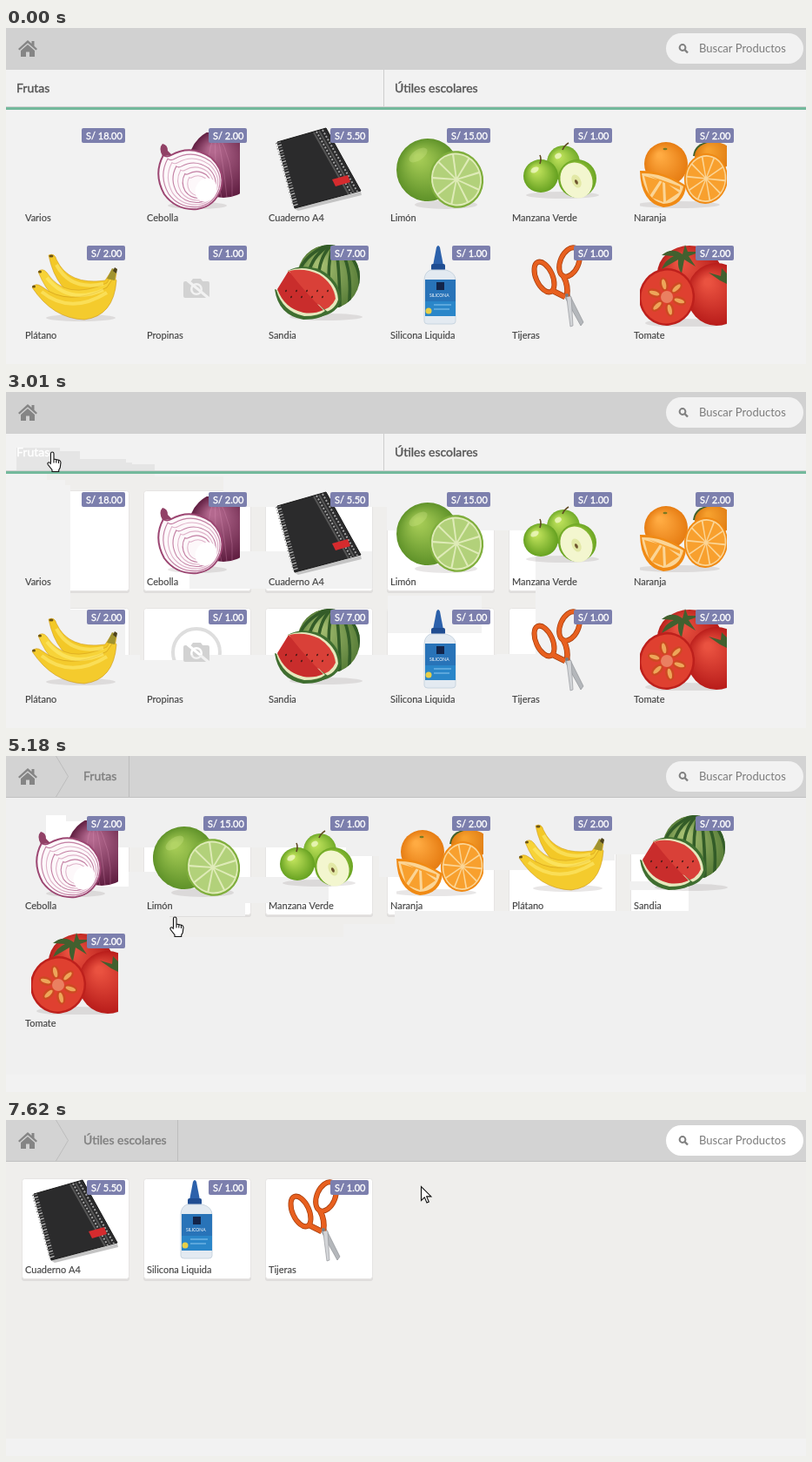
These frames come from a looping animation (920 px wide and 386 px high, 7.99 s). An HTML page with a canvas:

```html
<!DOCTYPE html>
<html lang="es">
<head>
<meta charset="utf-8">
<title>Catálogo de productos</title>
<style>
html, body { margin: 0; width: 100%; height: 100%; overflow: hidden; background: #f2f2f2; }
canvas { display: block; }
</style>
</head>
<body>
<canvas id="stage" width="920" height="386"></canvas>
<script>
const g = document.getElementById('stage').getContext('2d');
const LOOP = 7990, STEP = 120, TAU = Math.PI * 2;
const FONT = 'px Lato, "Open Sans", sans-serif';

// ---------- drawing helpers ----------
function rect(x, y, w, h, fill) { g.fillStyle = fill; g.fillRect(x, y, w, h); }

function round(x, y, w, h, r, fill, stroke) {
  g.beginPath();
  g.roundRect(x, y, w, h, r);
  g.fillStyle = fill;
  g.fill();
  if (stroke) { g.strokeStyle = stroke; g.lineWidth = 1; g.stroke(); }
}

function shape(d, fill, stroke, w = 1) {
  const p = new Path2D(d);
  if (fill) { g.fillStyle = fill; g.fill(p); }
  if (stroke) { g.strokeStyle = stroke; g.lineWidth = w; g.stroke(p); }
}

function oval(x, y, rx, ry, fill, rot = 0, stroke, w = 1) {
  g.beginPath();
  g.ellipse(x, y, rx, ry, rot, 0, TAU);
  if (fill) { g.fillStyle = fill; g.fill(); }
  if (stroke) { g.strokeStyle = stroke; g.lineWidth = w; g.stroke(); }
}

function ball(x, y, rx, ry, light, dark, rot = 0) {
  const r = Math.max(rx, ry);
  const grad = g.createRadialGradient(x - rx * .3, y - ry * .4, r * .1, x, y, r);
  grad.addColorStop(0, light);
  grad.addColorStop(1, dark);
  oval(x, y, rx, ry, grad, rot);
}

// a thin stroke gives the medium weight
function text(s, x, y, size, fill, heavy = 0) {
  g.font = size + FONT;
  g.fillStyle = g.strokeStyle = fill;
  g.fillText(s, x, y);
  if (heavy) { g.lineWidth = heavy; g.strokeText(s, x, y); }
}

function at(x, y, draw) {
  g.save();
  g.translate(x, y);
  draw();
  g.restore();
}

function crop(y, h) {
  g.beginPath();
  g.rect(11, y, 100, h);
  g.clip();
}

function shadow(x, y, rx, ry) { oval(x, y, rx, ry, 'rgba(90,80,80,.14)'); }

// cut face with n wedges
function citrus(x, y, rx, ry, rot, rind, pith, flesh, n) {
  oval(x, y, rx, ry, rind, rot);
  oval(x, y, rx * .93, ry * .93, pith, rot);
  at(x, y, () => {
    g.rotate(rot);
    g.scale(rx, ry);
    g.fillStyle = flesh;
    for (let i = 0; i < n; i++) {
      const a = i * TAU / n, m = a + Math.PI / n;
      g.beginPath();
      g.moveTo(.08 * Math.cos(m), .08 * Math.sin(m));
      g.arc(0, 0, .87, a + .04, a + TAU / n - .04);
      g.fill();
    }
  });
}

// ---------- product pictures, in card coordinates ----------
const art = {
  onion() {
    crop(7, 90);
    shadow(62, 91, 34, 4);
    ball(92, 42, 40, 40, '#b4698f', '#5f1d40');
    for (let i = 0; i < 4; i++)
      shape(`M84 6Q${66 + i * 13} 40 ${84 + i * 6} 82`, null, 'rgba(220,150,185,.3)', 1);
    const skin = 'M23 33Q27 36 32 33Q55 20 78 36Q95 52 89 72Q82 92 62 95Q38 97 24 78Q11 55 23 33Z';
    shape(skin, '#fdf8fa', '#9c4672', 2);
    for (let i = 1; i < 7; i++) {
      const k = 1 - i * .11;
      at(68 * (1 - k), 72 * (1 - k), () => {
        g.scale(k, k);
        shape(skin, null, i % 2 ? '#c27fa3' : '#dfb3ca', 1.1 / k);
      });
    }
    oval(72, 73, 12, 14, '#fff', .5);
    shape('M22 34Q17 25 22 20Q28 21 28 28L33 33Z', '#914166');
  },
  lime() {
    shadow(68, 90, 36, 5);
    ball(47, 50, 36, 36, '#a5cb55', '#5f9229', -.6);
    oval(36, 33, 12, 6, 'rgba(220,240,150,.25)', -.6);
    citrus(80, 61, 31, 33, -.3, '#7fae3c', '#dfebb8', '#b2d17a', 9);
  },
  apple() {
    shadow(62, 79, 42, 4);
    ball(63, 42, 19, 20, '#bfe25b', '#6fa928');
    ball(37, 57, 20, 19, '#c3e45d', '#64a01f');
    ball(79, 60, 22, 22, '#bfe04e', '#6ba524');
    oval(78, 62, 18, 21, '#f3f6cf', -.45);
    oval(78, 63, 5, 8, '#e2e8a5', -.45);
    oval(78, 64, 1.6, 3, '#6f5530', -.45);
    oval(30, 50, 5, 3, 'rgba(255,255,230,.6)', -.5);
    oval(57, 34, 4, 3, 'rgba(255,255,230,.6)', -.5);
    shape('M62 27Q64 22 69 19M36 43Q38 37 36 33', null, '#5f4a22', 1.6);
  },
  orange() {
    crop(16, 78);
    shadow(55, 90, 48, 4);
    shape('M72 34Q74 18 92 18Q98 28 90 36Z', '#41612c');
    ball(96, 34, 22, 16, '#f6a02d', '#de7a12');
    ball(41, 43, 25, 25, '#ffab42', '#e67c12');
    oval(40, 26, 2.5, 1.2, '#7a7a24');
    citrus(87, 60, 25, 29, .1, '#f08a14', '#fbd596', '#f8a02e', 10);
    shape('M11 51Q36 50 64 68Q62 91 38 93Q12 88 11 51Z', '#f08a14');
    shape('M13 54Q36 53 61 69Q57 88 38 89Q17 84 13 54Z', '#fbd596');
    shape('M16 57L34 62 22 80ZM37 63L38 87 25 82ZM40 64L56 76 41 86ZM20 56L57 69 57 73Z', '#f8a02e');
  },
  banana() {
    shadow(68, 85, 40, 4);
    shape('M31 13Q38 10 40 18Q54 48 96 42L104 30 109 34Q104 64 73 64Q40 57 31 13Z', '#f3c827', '#d09a18', .6);
    shape('M19 32Q24 27 29 33Q50 66 98 45L105 33 108 38Q103 78 67 78Q34 70 19 32Z', '#f7d338', '#d3a01d', .6);
    shape('M12 50Q16 44 23 49Q54 73 98 50L106 38 109 42Q106 83 72 87Q36 86 12 50Z', '#f4cb2d', '#cb9617', .6);
    shape('M23 55Q56 82 98 56M29 39Q54 70 94 53M40 24Q56 54 94 46', null, 'rgba(255,238,120,.55)', 4);
    shape('M98 40L104 28 109 30 107 42Z', '#a09330');
    shape('M105 31L107 27 110 29 109 34Z', '#4d421b');
    oval(34, 14, 2.5, 1.6, '#6b5315');
    oval(21, 32, 2, 1.6, '#6b5315');
    oval(14, 49, 2, 1.6, '#6b5315');
  },
  camera(fresh) {
    if (fresh) oval(61, 51, 27, 27, null, 0, '#dedede', 4);
    const c = '#d2d2d2', bg = fresh ? '#fff' : '#f2f2f2';
    round(46, 43, 30, 19, 2, c);
    shape('M54 44L57 40H66L69 44Z', c);
    oval(61, 52, 7, 7, bg);
    oval(61, 52, 4.5, 4.5, c);
    shape('M47 39L77 64', null, bg, 3);
  },
  melon() {
    shadow(70, 84, 42, 4);
    g.save();
    g.beginPath();
    g.ellipse(73, 38, 36, 37, 0, 0, TAU);
    g.clip();
    ball(73, 38, 37, 37, '#a3bd70', '#587d38');
    for (let i = 0; i < 8; i++)
      shape(`M80 -2Q${14 + i * 18} 22 ${50 + i * 9} 82`, null, '#335c28', 3.6);
    g.restore();
    // back piece, then the wedge in front
    shape('M26 31Q42 22 64 30Q86 42 87 64Q84 80 62 84Q40 84 26 31Z', '#3f6e30');
    shape('M26 31Q44 24 63 33Q83 45 84 64Q80 78 62 80Q40 78 26 31Z', '#e6e8bd');
    shape('M28 31Q45 27 62 35Q79 46 81 63Q76 75 62 77Q42 76 28 31Z', '#d94038');
    shape('M11 52Q15 82 44 87Q66 87 72 78L64 72Z', '#3f6e30');
    shape('M13 53Q20 78 45 83Q62 83 69 77L62 70Z', '#e6e8bd');
    shape('M14 52L27 31Q48 58 67 76Q56 81 44 79Q22 74 14 52Z', '#c92d2c');
    for (let i = 0; i < 9; i++) oval(24 + i * 6, 54 + (i * 7) % 14, .9, 1.4, '#4a1a15', .4);
  },
  bottle() {
    shape('M57 4Q59 0 61 4L65 25H53Z', '#2c61ab');
    round(51, 23, 16, 8, 2, '#1f4d92');
    shape('M50 30H68Q79 33 79 42V89Q79 92 75 92H47Q43 92 43 89V42Q43 33 50 30Z', '#e3eaf1', '#c9d5e0');
    rect(44, 41, 35, 42, '#2873b8');
    rect(44, 66, 35, 17, '#2a86c9');
    rect(57, 44, 9, 9, '#13254a');
    text('SILICONA', 49, 61, 5, '#fff');
    shape('M54 70H74M54 75H72', null, '#8cc7ef', 1.2);
    oval(48, 77, 3.5, 3.5, '#e8cf48');
  },
  scissors() {
    shape('M63 58L68 54 86 90 83 94Z', '#b4b7bb', '#85888d', .6);
    shape('M66 56L72 61 74 94 71 95Z', '#d2d4d7', '#8b8e92', .6);
    for (const [c, w] of [['#a9400f', 6], ['#e8601f', 4.4]]) {
      oval(41, 38, 9.5, 18.5, null, -.42, c, w);
      oval(70, 21, 10.5, 17.5, null, .4, c, w);
      shape('M49 53L65 61M63 37Q69 48 67 60', null, c, w + .6);
    }
    oval(67, 59, 2, 2, '#777b80');
  },
  tomato() {
    crop(0, 95);
    shadow(65, 91, 48, 5);
    ball(68, 34, 37, 32, '#ea5240', '#b51c1a');
    ball(99, 58, 34, 36, '#ea5240', '#b81c1a');
    shape('M60 12Q48 3 36 13L50 14Q40 18 36 29L55 18Q54 28 59 34L62 18 75 26 67 14 81 9 66 9 63 1Z', '#42602f');
    shape('M103 42L90 33 104 37 105 28 111 34V46Z', '#42602f');
    oval(42, 61, 32, 33, '#bd201c', .3);
    oval(42, 61, 29.5, 30.5, '#df4030', .3);
    for (let i = 0; i < 6; i++) {
      const a = i * TAU / 6 + .3, c = Math.cos(a), s = Math.sin(a);
      oval(42 + 15 * c, 61 + 15 * s, 8, 5, '#cd4a22', a);
      oval(42 + 15 * c, 61 + 15 * s, 6, 2.4, '#eda65a', a);
    }
    oval(42, 61, 7, 7, '#ea8061');
  },
  notebook() {
    shape('M33 94L110 75 111 79 38 97Z', '#c4c4c4');
    shape('M14 18L70 2 110 74 34 94Z', '#2b2b2c', '#191919');
    shape('M56 7L96 78M62 5L102 76', null, '#555', 2);
    g.setLineDash([2, 2]);
    shape('M59 6L99 77M66 4L106 75', null, '#a4a4a4', 2);
    g.setLineDash([]);
    for (let i = 0; i < 24; i++) {
      const x = 14 + i * .85, y = 19 + i * 3.1;
      shape(`M${x - 2} ${y + 1}L${x + 4} ${y - 1}`, null, i % 2 ? '#bbb' : '#777', 1.3);
    }
    shape('M77 61L95 56 98 64 81 69Z', '#d52b2e');
  }
};

// ---------- catalogue ----------
const item = (name, price, pic) => ({ name, price, pic });
const all = [
  item('Varios', '18.00'), item('Cebolla', '2.00', 'onion'),
  item('Cuaderno A4', '5.50', 'notebook'), item('Limón', '15.00', 'lime'),
  item('Manzana Verde', '1.00', 'apple'), item('Naranja', '2.00', 'orange'),
  item('Plátano', '2.00', 'banana'), item('Propinas', '1.00', 'camera'),
  item('Sandia', '7.00', 'melon'), item('Silicona Liquida', '1.00', 'bottle'),
  item('Tijeras', '1.00', 'scissors'), item('Tomate', '2.00', 'tomato')
];
const pick = ids => ids.map(i => all[i]);
const home = { items: all, top: 113, bg: '#f2f2f2' };
const fruit = { items: pick([1, 3, 4, 5, 6, 8, 11]), top: 67, bg: '#f0f0f0', title: 'Frutas', end: 141 };
const school = { items: pick([2, 9, 10]), top: 67, bg: '#efeeec', title: 'Útiles escolares', end: 197, fresh: true };
const pages = [[0, home], [3130, fruit], [6390, home], [7620, school]];

// pointer stops: start time, then x, y every STEP ms
const moves = [
  [1000, 194, 284, 154, 120, 154, 97, 128, 83],
  [1500, 74, 81, 74, 97, 137, 226, 422, 278],
  [2000, 547, 277],
  [2150, 592, 159, 494, 210, 421, 159, 233, 132],
  [2650, 141, 97, 121, 83, 68, 77, 47, 68, 46, 68],
  [3380, 52, 75, 81, 126, 124, 109, 265, 105, 374, 115, 412, 139, 470, 139],
  [4220, 626, 131, 700, 120, 768, 113, 768, 154, 600, 154, 430, 150, 371, 169],
  [5060, 275, 184, 188, 184, 105, 212, 100, 231],
  [5670, 100, 180, 72, 150, 60, 110, 45, 67, 30, 42, 27, 28, 27, 28],
  [6510, 84, 56, 30, 80, 232, 107],
  [6900, 320, 112, 436, 109, 470, 95, 490, 80, 485, 72, 478, 75, 477, 76]
];
const stops = moves.flatMap(([t, ...p]) =>
  Array.from({ length: p.length / 2 }, (_, i) => ({ t: t + i * STEP, x: p[2 * i], y: p[2 * i + 1] })));

const cardPos = (page, i) => [18 + i % 6 * 140, page.top + (i / 6 | 0) * 135];

function drawCard(page, i, fresh) {
  const { name, price, pic } = page.items[i], [x, y] = cardPos(page, i);
  if (fresh) {
    round(x, y + 2, 124, 116, 3, '#dfdddc');
    round(x + .5, y + .5, 123, 115, 3, '#fff', '#e6e4e3');
  }
  if (pic) at(x, y, () => art[pic](fresh));
  text(name, x + 4, y + 109, 11, '#444', .15);
  const w = price.length > 4 ? 50 : 44;
  round(x + 119 - w, y + 2, w, 17, 2, '#7c7fad');
  text('S/ ' + price, x + 124 - w, y + 15, 11, '#fff', .35);
}

function drawHeader(page) {
  rect(0, 0, 920, 48, page.title ? '#d3d3d3' : '#d1d1d1');
  shape('M25 14L14 24 15.5 25.5 25 17.3 34.5 25.5 36 24 32.5 20.8V15H29.5V18Z', '#858585');
  shape('M25 19L17 26V33H23V27.5H27V33H33V26Z', '#858585');
  if (page.title) {
    rect(0, 47, 920, 1, '#c2c2c2');
    shape(`M57.5 0L71.5 23.5 57.5 47M${page.end + .5} 0V47`, null, '#bdbdbd');
    text(page.title, 89, 28, 14, '#7f7f7f', .4);
  }
  round(759, 6, 158, 35, 17.5, page.fresh ? '#fff' : '#f2f2f2');
  oval(778, 22.5, 3.4, 3.4, null, 0, '#808080', 2);
  shape('M780.5 25L784 28.5', null, '#808080', 2.4);
  text('Buscar Productos', 797, 28, 13, '#7b7b7b');
}

function drawPage(page, fresh, tab) {
  rect(0, 48, 920, 338, '#f2f2f2');
  rect(0, 48, 920, 318, fresh ? '#efeeec' : page.bg);
  if (!page.title) {
    rect(0, 48, 920, 42, fresh ? '#e5e5e5' : '#f2f2f2');
    rect(434, 48, 1, 42, '#cdcdcd');
    rect(0, 90, 920, 1, '#cfcfcf');
    rect(0, 91, 920, 3, '#74b99c');
    text('Frutas', 12, 74, 14, tab === 1 ? '#fff' : '#555', .4);
    text('Útiles escolares', 447, 74, 14, tab === 2 ? '#fff' : '#555', .4);
  }
  page.items.forEach((_, i) => drawCard(page, i, fresh));
}

function drawPointer(page, { x, y }, tab) {
  const hx = x + 5;
  const onCard = page.items.some((_, i) => {
    const [cx, cy] = cardPos(page, i);
    return hx >= cx && hx < cx + 124 && y >= cy && y < cy + 118;
  });
  const hand = onCard || tab || (y < 48 && hx < 45);
  at(x + .5, y + .5, () => shape(hand
    ? 'M4 13V2.2a1.7 1.7 0 0 1 3.5 0V8.5l6 1.3q2 .6 2 2.8l-.8 6-1.5 2.5V23H5.5V21L.8 15q-1-2 .6-2.6T4 14.5M7.5 8.5V13M10.3 9.5V13M13 10V13.5'
    : 'M0 0V16L3.8 12.4 6.5 18.5 8.8 17.5 6.2 11.4H11.4Z', '#fff', '#111', 1.1));
}

function draw(t) {
  const [from, page] = pages.filter(p => p[0] <= t).pop();
  const seen = stops.filter(s => s.t <= t), last = seen[seen.length - 1];
  const tab = last && !page.title && last.y >= 48 && last.y < 90
    ? (last.x < 60 && last.y < 75 ? 1 : last.x > 434 ? 2 : 0) : 0;
  drawHeader(page);
  drawPage(page, page.fresh, tab);
  // areas the pointer swept are repainted with crisp cards
  if (last && !page.fresh) {
    g.save();
    g.beginPath();
    seen.forEach((b, i) => {
      const a = seen[i - 1] || b;
      if (b.t <= from) return;
      const x = Math.min(a.x, b.x), y = Math.max(48, Math.min(a.y, b.y));
      g.rect(x, y, Math.max(a.x, b.x) + 17 - x, Math.max(0, Math.max(a.y, b.y) + 24 - y));
    });
    if (tab === 1) g.rect(12, 64, 50, 27);
    if (tab === 2) g.rect(447, 64, 98, 27);
    g.clip();
    drawPage(page, true, tab);
    g.restore();
  }
  if (last) drawPointer(page, last, tab);
}

let shown = -1;
const start = performance.now();
function tick(now) {
  const t = Math.max(0, now - start) % LOOP;
  const step = stops.filter(s => s.t <= t).length;
  if (step !== shown) draw(t);
  shown = step;
  requestAnimationFrame(tick);
}
requestAnimationFrame(tick);
</script>
</body>
</html>
```
